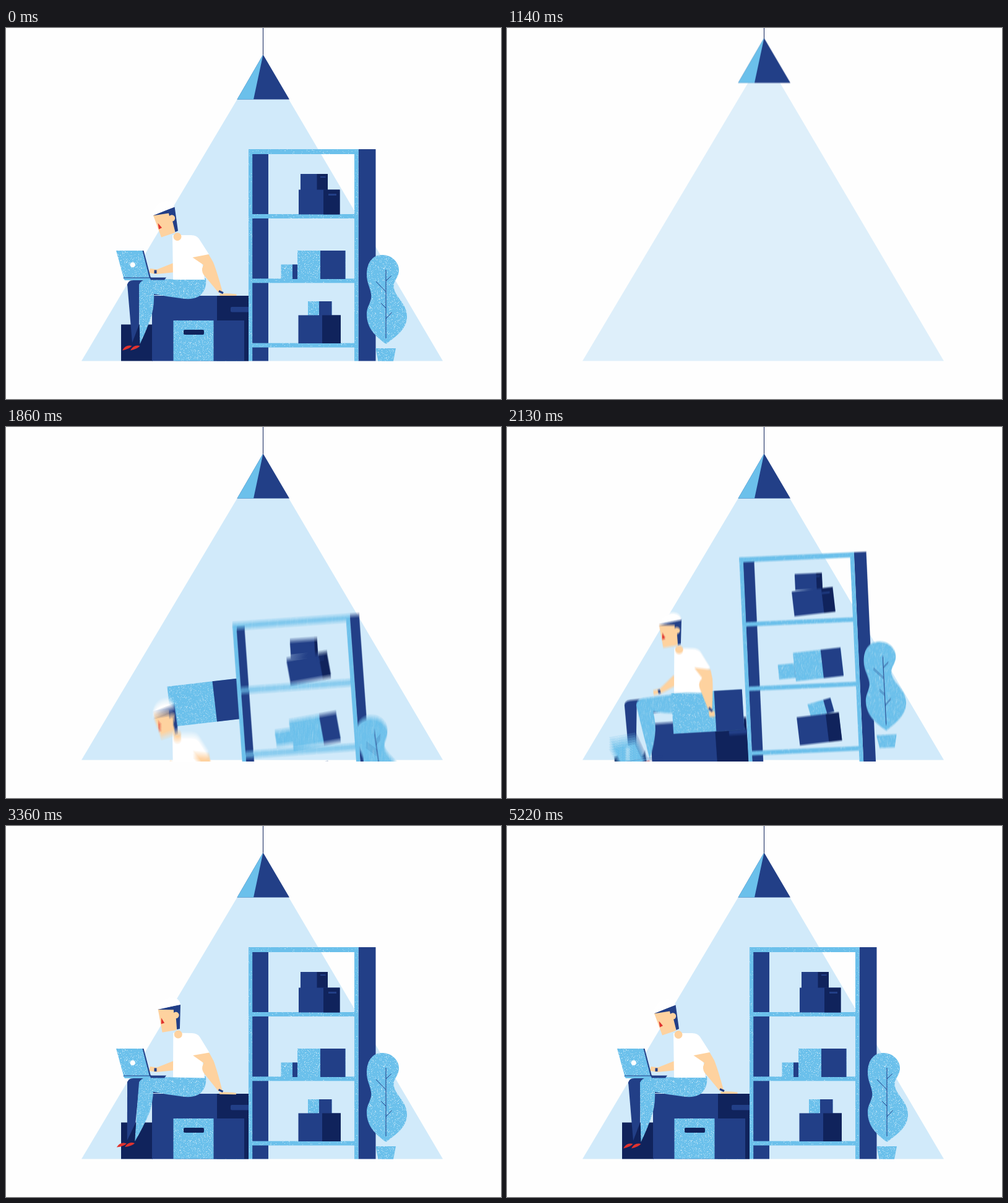
An HTML page with a canvas that plays this animation: 800 by 600 pixels, repeating every 5250 ms.

```html
<!DOCTYPE html>
<html lang="en">
<head>
<meta charset="utf-8">
<title>Storeroom</title>
<style>
html, body { margin: 0; width: 100%; height: 100%; overflow: hidden; background: #fefefe; }
canvas { display: block; }
</style>
</head>
<body>
<canvas id="stage" width="800" height="600"></canvas>
<script>
const LOOP = 5250, STEP = 30, REST = 5220, FLOOR = 541;
const PAPER = '#fefefe', BEAM = '#d1eafa', SKY = '#6bc0eb', NAVY = '#223f87',
      DARK = '#10235c', SKIN = '#fed29f', RED = '#e0332f', WHITE = '#ffffff';

const stage = document.getElementById('stage').getContext('2d');
const layer = document.createElement('canvas');
layer.width = 800;
layer.height = 600;
const c = layer.getContext('2d');

// Light blue with seeded white grain
function grain(density) {
  const tile = document.createElement('canvas');
  tile.width = tile.height = 160;
  const g = tile.getContext('2d');
  let seed = 7;
  const rnd = () => (seed = seed * 16807 % 2147483647) / 2147483647;
  g.fillStyle = SKY;
  g.fillRect(0, 0, 160, 160);
  for (let i = 0; i < 25600 * density; i++) {
    g.fillStyle = `rgba(225,243,252,${0.25 + rnd() * 0.55})`;
    g.fillRect(Math.floor(rnd() * 160), Math.floor(rnd() * 160), 1, 1);
  }
  return c.createPattern(tile, 'repeat');
}
const GRAIN = grain(0.13), SOFT = grain(0.05);

const ramp = (t, from, to) => Math.max(0, Math.min(1, (t - from) / (to - from)));

// Shoot up from below the floor, hang at the peak, drop into place.
// `left` is the share of the whole move still to come.
function rise(t, { start, peak, land, drop, height }) {
  const up = ramp(t, start, peak), down = ramp(t, peak, land);
  return {
    dy: up < 1 ? (drop + height) * (1 - up) ** 2.5 - height : -height * (1 - down * down),
    left: 1 - ramp(t, start, land)
  };
}

// Grows to 1 as the man sits up, then dies away until the loop ends
const upright = t => t < 2610
  ? Math.sin(ramp(t, 1937, 2610) * Math.PI / 2)
  : (1 - ramp(t, 2610, REST)) ** 2.45;

function fill(d, color) {
  c.fillStyle = color;
  c.fill(new Path2D(d));
}
function rect(x0, y0, x1, y1, color) {
  c.fillStyle = color;
  c.fillRect(x0, y0, x1 - x0, y1 - y0);
}
function stroke(d, width, color = NAVY) {
  c.strokeStyle = color;
  c.lineWidth = width;
  c.stroke(new Path2D(d));
}
function disc(x, y, r, color) {
  c.fillStyle = color;
  c.beginPath();
  c.arc(x, y, r, 0, 7);
  c.fill();
}
function posed(px, py, dx, dy, deg, draw) {
  c.save();
  c.translate(px + dx, py + dy);
  c.rotate(deg * Math.PI / 180);
  c.translate(-px, -py);
  draw();
  c.restore();
}

// Two-tone box that tilts and shows less of its side while it rises
function carton(t, { box: [x0, y0, x1, y1], edge, colors, move, slide, tilt, turn = 18, detail }) {
  const { dy, left } = rise(t, move);
  posed((x0 + x1) / 2, (y0 + y1) / 2, slide * left, dy, tilt * left, () => {
    rect(x0, y0, x1, y1, colors[0]);
    rect(edge + turn * left, y0, x1, y1, colors[1]);
    if (detail) detail(t);
  });
}

const BLUE = [GRAIN, NAVY], DEEP = [NAVY, DARK];
const shelfMove = { start: 1560, peak: 2430, land: 2600, drop: 360, height: 16 };
const manMove = { start: 1740, peak: 2430, land: 2750, drop: 270, height: 12 };
const plantMove = { start: 1740, peak: 2460, land: 2865, drop: 190, height: 55 };
const laptopMove = { start: 1980, peak: 2460, land: 2725, drop: 409, height: 25 };

const goods = (box, edge, colors, slide, tilt, land, detail) =>
  ({ box, edge, colors, slide, tilt, detail, move: { ...shelfMove, land, height: 26 } });

const stock = [
  goods([476, 236, 520, 262], 502.5, DEEP, -23, -5.5, 2620, () => rect(508, 240, 516.5, 242, NAVY)),
  goods([473, 261.5, 539.5, 301.5], 513, DEEP, -24, -14.5, 2600, () => rect(521, 268, 534, 271, NAVY)),
  goods([444.5, 382.5, 471, 406], 463, BLUE, -12, -12, 2655),
  goods([471, 360, 548.5, 406], 508, BLUE, -15, -14.5, 2600),
  goods([488, 442, 526.5, 465], 506, BLUE, 0, -34, 2640),
  goods([472.5, 464.5, 541, 510], 511, DEEP, -4, -14, 2665)
];

const leftBox = {
  box: [186, 479.5, 237, 538.5], edge: 237, colors: [DARK, DARK], turn: 0, slide: -8, tilt: -12,
  move: { start: 2100, peak: 2520, land: 2780, drop: 70, height: 40 }
};
const bigBox = {
  box: [236, 433, 392, 538.5], edge: 341, colors: DEEP, turn: 0, slide: -3, tilt: -5.5,
  move: { start: 1900, peak: 2460, land: 2700, drop: 180, height: 8 },
  detail: () => fill('M365 451H392V459.5H365Q363 459.5 363 457.5V453Q363 451 365 451Z', NAVY)
};
const frontBox = {
  box: [270.5, 473, 385, 538.5], edge: 335.5, colors: BLUE, slide: -14, tilt: -14,
  move: { start: 1260, peak: 1870, land: 2400, drop: 107, height: 60 },
  detail(t) {
    c.globalAlpha = ramp(t, 2340, 2490);
    fill('M289 488H318Q320 488 320 490V494Q320 496 318 496H289Q287 496 287 494V490Q287 488 289 488Z', DARK);
    c.globalAlpha = 1;
  }
};

function beam(t) {
  c.globalAlpha = ramp(t, 960, 1230);
  fill('M415.5 45L706 538.5H122Z', BEAM);
  c.globalAlpha = 1;
}

function lamp(t) {
  posed(0, 0, 0, -120 * (1 - ramp(t, 840, 1800)) ** 4, 0, () => {
    stroke('M415.5 -10V44', 1, DARK);
    fill('M415.5 43L373.5 115.5H458Z', NAVY);
    fill('M415.5 43L373.5 115.5H400Z', SKY);
  });
}

function shelf(t) {
  const { dy, left } = rise(t, shelfMove);
  const depth = 28 - 18 * left, end = 597.5 - depth;
  posed(494.5, 367, -20 * left, dy, -5.8 * left, () => {
    rect(398, 198, 396 + depth, 538.5, NAVY);
    rect(end, 196, 597.5, 538.5, NAVY);
    rect(392, 196, end, 204, SOFT);
    for (let i = 0; i < 3; i++) rect(396, 301 + i * 104.3, end - 4, 308 + i * 104.3, SOFT);
    rect(392, 196, 398.2, 538.5, SOFT);
    rect(end - 6.5, 196, end, 538.5, SOFT);
  });
}

function plant(t) {
  const { dy, left } = rise(t, plantMove);
  posed(614, 525, 0, dy, 9.5 * left * Math.cos(Math.PI * left), () => {
    fill('M597.5 518H630L626 538.7H601.5Z', GRAIN);
    fill('M614 511C598 499 583 486 583 463C583 449 592 443 590 430C588 418 583 412 583 399' +
      'C583 380 592 367 608 367C625 367 635 380 635 391C635 405 625 408 627 421' +
      'C630 437 648 445 648 467C648 487 629 500 614 511Z', GRAIN);
    stroke('M614 391V502M614 409L622.5 401M614 426.5L598 410M614 453L606 445M614 470L623.5 460', 1);
  });
}

function legs(t) {
  const { dy, left } = rise(t, manMove);
  const thigh = Math.max(-6, -0.9 * dy), lift = Math.abs(thigh);
  const shin = t < 2900
    ? Math.max(-15, 9 - 22 * ((2900 - t) / 770) ** 2)
    : 9 * (1 - ramp(t, 2900, REST)) ** 2.7;
  const shoe = dx => posed(203, 513, dx, -lift, Math.max(0, thigh) * 7, () =>
    fill('M188 521.5Q193 511.5 203.5 514Q200 519 188 521.5Z', RED));

  posed(310, 415, -11 * left, dy, thigh, () => {
    fill('M196 417Q196 408 206 408H300V432H232L216 420Z', NAVY);
    posed(206, 414, 0, 0, Math.max(0, shin) - thigh, () => {
      fill(`M196 414L216 412L215 480L204 ${509 - lift}Z`, NAVY);
      shoe(0);
    });
    posed(225, 416, 0, 0, shin - thigh, () => {
      fill(`M215 414L239 424Q240 446 236 462Q229 485 216.5 ${511 - lift}Q215 450 215 414Z`, GRAIN);
      shoe(13);
    });
    fill('M215 420Q214 407.5 229 407L323 405Q325 423 313 433Q304 440 285 437.5Q262 435 239 430L222 424Z', GRAIN);
  });
}

function typingArm(t) {
  const { dy, left } = rise(t, manMove);
  posed(270, 388, 0, dy, -60 * left * left, () => {
    fill('M273 379L244 390.5L233 389L231 396L243 398L273 395Z', SKIN);
    rect(239.5, 391.5, 243.5, 397, NAVY);
  });
}

// `raised` is 1 while the arm hangs free and 0 once the palm lies flat
function restingArm(raised) {
  const turn = 17 * raised;
  posed(318, 370, 0, 0, turn, () => {
    fill('M301.5 371L327.5 366L335 379Q341 394 350 427L343.5 428L322 402Q316 396 317 389L319 383Z', SKIN);
    posed(347, 428, 0, 0, -turn, () => {
      const tip = 372.5 - 18 * raised, palm = 433 + 6 * raised;
      fill(`M344.5 430Q352 428.5 ${tip} 430.5V${palm}H346Z`, SKIN);
    });
    stroke('M344 425.5L351 428.7', 3.2);
  });
}

function head() {
  fill('M238 303L270 296L273 331L251 338.5Z', SKIN);
  fill('M237.5 303.5L272.5 289L278 328L273.5 330L268 308L264 304L263 299.5Z', NAVY);
  fill('M236.5 303Q240 285 254 281Q268 277 272.5 289.5Z', WHITE);
  disc(268, 307.5, 5.2, SKIN);
  fill('M245.5 315.5L252 323L247 325.5Z', RED);
}

function torso(t) {
  const { dy } = rise(t, manMove);
  const tall = upright(t), lean = 2.5 * tall;
  posed(300, 405, Math.max(0, -dy) * 0.4, dy, lean, () => {
    fill('M269 335H299Q308 335 312 341L328 366L316 372L321 407H270Z', WHITE);
    restingArm(Math.min(1.1, 1 - ramp(t, 2130, 3020)));
    posed(277, 338, 0, 0, 22 * tall - lean, head);
    disc(277, 337.5, 6.5, SKIN);
  });
}

function laptop(t) {
  const { dy, left } = rise(t, laptopMove);
  posed(210, 383, -12 * left, dy, -12.5 * left, () => {
    fill('M189 404H236L234 408H192Z', SKY);
    fill('M232 403.5H259L256 407.5H234Z', NAVY);
    fill('M178 360H221L232.5 404H190Z', GRAIN);
    fill('M220.5 360H222.5L234 404H231.8Z', NAVY);
    stroke('M190 404H235', 1);
    disc(204.7, 383, 4.2, WHITE);
  });
}

function scene(t) {
  c.fillStyle = PAPER;
  c.fillRect(0, 0, 800, 600);
  c.save();
  c.beginPath();
  c.rect(0, 0, 800, FLOOR);
  c.clip();
  beam(t);
  lamp(t);
  carton(t, leftBox);
  carton(t, bigBox);
  typingArm(t);
  legs(t);
  carton(t, frontBox);
  shelf(t);
  stock.forEach(item => carton(t, item));
  plant(t);
  torso(t);
  laptop(t);
  c.restore();
}

function render(now) {
  const t = Math.floor(now % LOOP / STEP) * STEP;
  stage.globalAlpha = 1;
  stage.fillStyle = PAPER;
  stage.fillRect(0, 0, 800, 600);
  if (t < 420) {
    scene(LOOP);
    stage.globalAlpha = 1 - t / 420;
    stage.drawImage(layer, 0, 0);
  } else if (t >= 840) {
    // Averaged sub-steps give the motion blur of the entrance
    const n = t < 2900 ? 6 : 1;
    for (let k = 0; k < n; k++) {
      scene(t + ((k + 0.5) / n - 0.5) * 18);
      stage.globalAlpha = 1 / (k + 1);
      stage.drawImage(layer, 0, 0);
    }
  }
}

function tick() {
  render(performance.now());
  requestAnimationFrame(tick);
}
tick();
</script>
</body>
</html>
```
